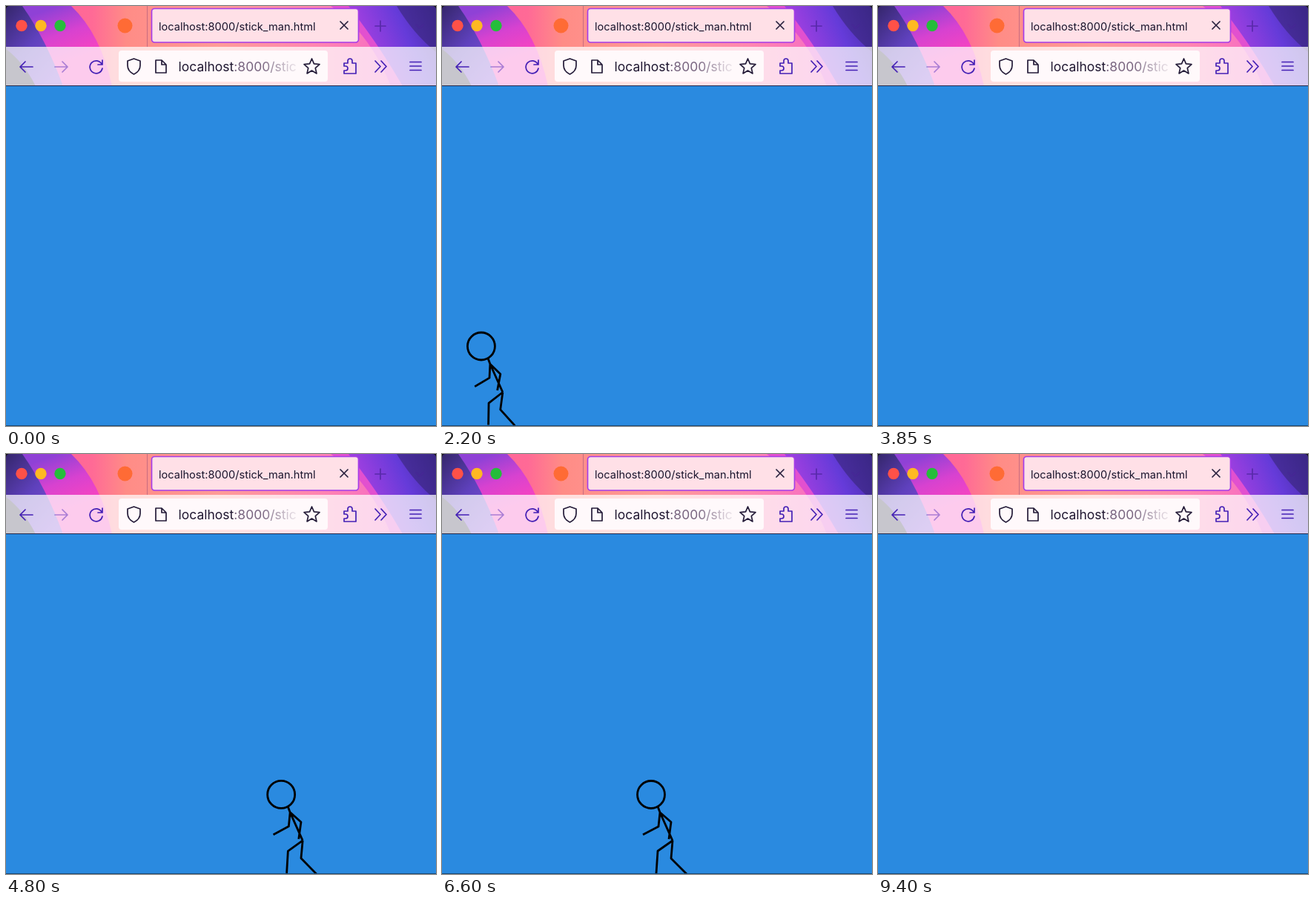
These frames come from a looping animation (580 by 566 pixels, 9.45 s). An HTML page:

```html
<!DOCTYPE html>
<html lang="en">
<head>
<meta charset="utf-8">
<title>Stick man</title>
<style>
  html, body { margin: 0; height: 100%; overflow: hidden; background: #2a8ae0; }
  svg { display: block; width: 580px; height: 566px; }
  text { font-family: Inter, "Open Sans", sans-serif; }
  .line { fill: none; stroke-width: 1.7; stroke-linecap: round; stroke-linejoin: round; }
</style>
</head>
<body>
<svg viewBox="0 0 580 566">
  <defs>
    <linearGradient id="sky">
      <stop offset="0" stop-color="#ff5c9a"/>
      <stop offset=".2" stop-color="#ff6a96"/>
      <stop offset=".28" stop-color="#ff8c86"/>
      <stop offset=".5" stop-color="#ff9b98"/>
      <stop offset=".72" stop-color="#ff86b0"/>
      <stop offset="1" stop-color="#f05bcf"/>
    </linearGradient>
    <linearGradient id="magenta" gradientUnits="userSpaceOnUse" x1="70" y1="0" x2="95" y2="70">
      <stop offset="0" stop-color="#8f41d6"/>
      <stop offset=".5" stop-color="#d742d0"/>
      <stop offset="1" stop-color="#f844c0"/>
    </linearGradient>
    <linearGradient id="violet" x2=".8" y2="1">
      <stop offset="0" stop-color="#35266c"/>
      <stop offset=".5" stop-color="#5f41bd"/>
      <stop offset="1" stop-color="#8650d8"/>
    </linearGradient>
    <linearGradient id="dusk" x2="1" y2="-.4">
      <stop offset="0" stop-color="#a13fe0"/>
      <stop offset=".45" stop-color="#653bd9"/>
      <stop offset="1" stop-color="#38278e"/>
    </linearGradient>
    <linearGradient id="urlFade" gradientUnits="userSpaceOnUse" x1="345" x2="393">
      <stop offset="0" stop-color="#77647f"/>
      <stop offset="1" stop-color="#77647f" stop-opacity=".1"/>
    </linearGradient>
  </defs>

  <rect width="580" height="566" fill="#2a8ae0"/>
  <g fill="none" stroke="#000" stroke-width="2.8" stroke-linejoin="round">
    <circle id="head" r="18.5"/>
    <path id="limbs"/>
  </g>
  <g id="scrollbar">
    <path d="M0 557H452Q457 557 457 561.5T452 566H0Z" fill="#1b456d"/>
    <path d="M0 556.5H452Q457 557 457 561" fill="none" stroke="#55a6ee"/>
  </g>
  <rect y="565" width="580" height="1" fill="#174a78"/>

  <!-- Browser theme -->
  <rect width="580" height="108" fill="url(#sky)"/>
  <path d="M10 0H88Q128 38 143 108H30Z" fill="url(#magenta)"/>
  <path d="M0 0H22Q54 45 77 108H0Z" fill="url(#violet)"/>
  <path d="M0 58Q24 76 40 108H0Z" fill="#35314c"/>
  <path d="M438 0H580V108H519Q492 38 438 0Z" fill="#e250cf"/>
  <path d="M462 0H580V108H535Q505 55 462 0Z" fill="url(#dusk)"/>
  <path d="M527 0H580V62Q550 38 527 0Z" fill="#33236f" opacity=".55"/>
  <path d="M0 0H5Q0 0 0 5ZM580 0H575Q580 0 580 5Z" fill="#111"/>
  <rect y="55" width="580" height="52" fill="#fff" opacity=".72"/>
  <rect y="107" width="580" height="1" fill="#26284a"/>

  <!-- Tab strip -->
  <circle cx="21" cy="26.5" r="7.7" fill="#ff5148"/>
  <circle cx="47" cy="26.5" r="7.7" fill="#ffb922"/>
  <circle cx="73" cy="26.5" r="7.7" fill="#25bd3b"/>
  <circle cx="160.5" cy="26.5" r="10" fill="#ff6b35"/>
  <path d="M190.5 0V55" stroke="#c76c80"/>
  <rect x="196.5" y="3.5" width="279" height="45.5" rx="4" fill="#ffe0e7" stroke="#a53de7" stroke-width="1.7"/>
  <text x="206" y="33" font-size="14.6" fill="#18152d">localhost:8000/stick_man.html</text>
  <path class="line" stroke="#28213e" stroke-width="1.5" d="M451 21L461 31M461 21L451 31"/>
  <path class="line" stroke="#4a2398" opacity=".75" d="M498 27H512M505 20V34"/>
  <path class="line" stroke="#4a2398" opacity=".5" d="M553 25L558 30L563 25"/>

  <!-- Toolbar -->
  <g class="line" stroke="#4420b5">
    <path d="M36 82H19M26 75L19 82L26 89"/>
    <path d="M66 82H83M76 75L83 82L76 89" opacity=".45"/>
    <path d="M129 78A8.5 8.5 0 1 0 130 84M130 73V79H124"/>
    <path d="M456 77H461V74Q461 71 464 71T467 74V77H472V91H456V87H458Q461 87 461 84T458 81H456Z"/>
    <path d="M498 74L505 81.5L498 89M506 74L513 81.5L506 89"/>
    <path d="M545 75.5H560M545 81H560M545 86.5H560"/>
  </g>
  <rect x="152" y="60" width="282" height="42" rx="4" fill="#fff9fb"/>
  <g class="line" stroke="#241b38">
    <path d="M172.5 71L181 74V80Q181 88 172.5 92Q164 88 164 80V74Z"/>
    <path d="M202 73H210L216 79V90H202ZM210 73V79H216"/>
    <path id="star"/>
  </g>
  <text x="232.5" y="88" font-size="17.5" fill="#201832">localhost<tspan fill="url(#urlFade)">:8000/stic</tspan></text>
</svg>

<script>
const LOOP = 9450, STEP = 50, STRIDE = 403;
const get = id => document.getElementById(id);
const clamp = v => Math.max(0, Math.min(1, v));
const progress = (t, from, to) => clamp((t - from) / (to - from));
const lerp = (a, b, p) => a + (b - a) * p;
const mix = (a, b, p) => a.map((v, i) => lerp(v, b[i], p));
const easeOut = p => 1 - (1 - p) ** 2;

// Joint positions are relative to the hip; limbs are [joint, end].
const standing = {
  head: [0, -70.5], neck: [0, -51], shoulder: [0, -41],
  arms: [[[-10, -23], [-15, -2]], [[10, -23], [15, -2]]],
  legs: [[[-10, 23], [-14, 45]], [[10, 23], [14, 45]]]
};
const running = {
  head: [-29, -62], neck: [-20, -46], shoulder: [-17, -38],
  arms: [[[-19, -19], [-40, -8]], [[-2, -25], [-5, -2]]],
  legs: [[[-20, 14], [-22, 44]], [[-2, 24], [19, 45]]]
};

function drawMan(x, y, run, swing) {
  const place = p => [x + p[0], y + p[1]];
  const joint = name => place(mix(standing[name], running[name], run));
  const limb = (name, side) => [0, 1].map(i => {
    const stride = mix(running[name][side][i], running[name][1 - side][i], swing);
    return place(mix(standing[name][side][i], stride, run));
  });
  const line = points => "M" + points.map(p => p.join()).join("L");
  const hip = [x, y], shoulder = joint("shoulder");
  const lines = [[joint("neck"), shoulder, hip]];
  for (const side of [0, 1])
    lines.push([shoulder, ...limb("arms", side)], [hip, ...limb("legs", side)]);
  get("limbs").setAttribute("d", lines.map(line).join(""));
  const [cx, cy] = joint("head");
  get("head").setAttribute("cx", cx);
  get("head").setAttribute("cy", cy);
}

function hipX(t) {
  if (t < 2700) return lerp(293, -80, progress(t, 1550, 2500) ** 1.5);
  if (t < 5700) return lerp(670, 316.5, easeOut(progress(t, 3850, 5700)));
  if (t < 6600) return lerp(316.5, 311, progress(t, 5700, 6600));
  return lerp(311, -80, progress(t, 6600, 8600) ** 1.5);
}

function render(t) {
  const run = progress(t, 1400, 1650);
  const swing = (1 - Math.cos((t - 6600) / STRIDE * 2 * Math.PI)) / 2;
  const bounce = 2.5 * Math.sin(swing * Math.PI);
  const drop = easeOut(progress(t, 250, 1000));
  drawMan(hipX(t), lerp(-20, 520.5, drop) + run * (.5 - bounce), run, swing);
  get("scrollbar").setAttribute("opacity", progress(t, 2550, 2650) * (1 - progress(t, 3300, 3600)));
}

const star = Array.from({ length: 10 }, (_, i) => {
  const r = i % 2 ? 5 : 11, a = (i / 5 - .5) * Math.PI;
  return [412.5 + r * Math.cos(a), 82 + r * Math.sin(a)].join();
});
get("star").setAttribute("d", "M" + star.join("L") + "Z");

const start = performance.now();
function tick() {
  const t = (performance.now() - start) % LOOP;
  render(Math.floor(t / STEP) * STEP);
  requestAnimationFrame(tick);
}
tick();
</script>
</body>
</html>
```
